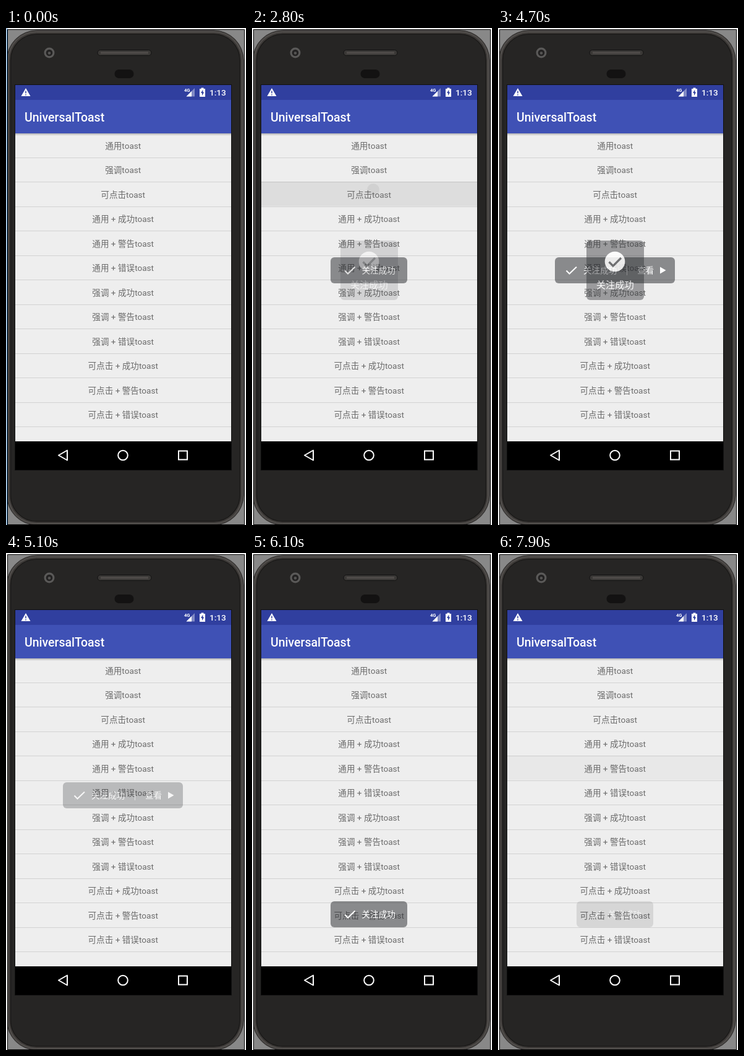
Write an HTML page that moves like this. It is 388 px wide and 802 px high and loops after 8000 ms.

```html
<!DOCTYPE html>
<html lang="zh-CN">
<head>
<meta charset="utf-8">
<title>UniversalToast</title>
<style>
html, body { margin: 0; width: 100%; height: 100%; overflow: hidden; background: #fff; }
svg { display: block; width: 388px; height: 802px; font-family: Roboto, "Noto Sans CJK SC", "Noto Sans CJK", sans-serif; }
.mid { text-anchor: middle; }
.toast { fill: #fff; font-size: 13.6px; }
.box { fill: #2a2c30; fill-opacity: .51; }
.line { fill: none; stroke: #fff; stroke-width: 2; }
</style>
</head>
<body>
<svg viewBox="0 0 388 802">
  <defs>
    <linearGradient id="shade" x2="0" y2="1">
      <stop offset="0" stop-color="#000" stop-opacity=".25"/><stop offset="1" stop-color="#000" stop-opacity="0"/>
    </linearGradient>
    <clipPath id="list"><rect x="15" y="170" width="349" height="497"/></clipPath>
    <path id="check" class="line" d="M-8 .5 L-3 5.5 L8.5 -5.5"/>
  </defs>

  <rect x="2" y="2" width="384" height="800" fill="#888"/>
  <rect x="1.5" y="4" width="382.5" height="798" rx="48" fill="#4a4745" stroke="#2b2928"/>
  <rect x="4" y="6.5" width="377.5" height="793" rx="45.5" fill="#3d3a38" stroke="#5a5754"/>
  <rect x="7.5" y="10" width="370.5" height="786" rx="42" fill="#262524" stroke="#1b1a19" stroke-width="1.5"/>
  <path d="M2.5 802V2.5H385.5V802M2 801.5H386" fill="none" stroke="#000"/>
  <rect id="edge" x="1" width="1" height="802"/>

  <circle cx="70" cy="40" r="8.5" fill="#5a5958"/>
  <circle cx="70" cy="40" r="5.3" fill="#232222"/>
  <circle cx="70" cy="40.5" r="2.3" fill="#555453"/>
  <rect x="148" y="35.5" width="87" height="9" rx="4.5" fill="#3a3836" stroke="#111"/>
  <path d="M153 40H230" stroke="#504d4a" stroke-width="3"/>
  <rect x="175.5" y="67" width="31" height="14" rx="7" fill="#131212"/>

  <rect x="14" y="91" width="351" height="623" fill="#111"/>
  <rect x="15" y="92" width="349" height="575" fill="#eee"/>
  <g id="rows" clip-path="url(#list)"></g>
  <rect x="15" y="170" width="349" height="4" fill="url(#shade)"/>
  <rect x="15" y="92" width="349" height="24" fill="#303f9f"/>
  <rect x="15" y="116" width="349" height="54" fill="#3f51b5"/>
  <text x="30" y="150.5" font-size="19.5" font-weight="500" fill="#fff">UniversalToast</text>

  <g fill="#fff">
    <path d="M32 97L39.5 110H24.5Z"/>
    <path d="M32 101.5V105.5M32 107V108.6" stroke="#303f9f" stroke-width="1.5"/>
    <path d="M305 97V110.5H291.5Z" fill-opacity=".4"/>
    <path d="M300 102V110.5H291.5Z"/>
    <text x="288" y="103" font-size="7.6" font-weight="700">4G</text>
    <path d="M313 98H315.5V96.5H319.5V98H322V111H313Z"/>
    <path d="M318.3 99.5L315 105H317V109.2L320.2 103.6H318.3Z" fill="#303f9f"/>
    <text x="329" y="109" font-size="13.6" font-weight="500">1:13</text>
  </g>

  <g id="wide">
    <rect class="box" x="92" y="370" width="194" height="42" rx="6"/>
    <use href="#check" x="118.5" y="391"/>
    <text class="toast" x="138" y="396">关注成功</text>
    <path d="M208.5 384V399" stroke="#fff" stroke-opacity=".65"/>
    <text class="toast" x="225" y="396">查看</text>
    <path d="M262 385.5L271.5 391L262 396.5Z" fill="#fff"/>
  </g>
  <g id="plain">
    <rect class="box" x="127" y="370" width="124" height="42" rx="6"/>
    <use href="#check" x="158" y="391"/>
    <text class="toast" x="177.5" y="396">关注成功</text>
  </g>
  <g id="strong">
    <rect class="box" x="143" y="343" width="93" height="96" rx="6"/>
    <circle cx="189" cy="377" r="16.3" fill="#fff"/>
    <path d="M179.5 377.5L186 384L199 371" fill="none" stroke="#6d6e70" stroke-width="3.2"/>
    <text class="mid" x="189.3" y="419.5" font-size="15.3" fill="#fff">关注成功</text>
  </g>

  <rect x="15" y="667" width="349" height="46"/>
  <path class="line" stroke-linejoin="round" d="M99 681.5V697.5L85 689.5Z"/>
  <circle class="line" cx="189" cy="689.5" r="7.8"/>
  <rect class="line" x="279" y="682.5" width="14" height="14"/>
</svg>
<script>
const LOOP = 8000, STEP = 100, TOP = 170.4, ROW = 39.47;
const $ = id => document.getElementById(id);
const kinds = ['通用', '强调', '可点击'];
const states = ['成功', '警告', '错误'];
const labels = [
  ...kinds.map(k => k + 'toast'),
  ...kinds.flatMap(k => states.map(s => `${k} + ${s}toast`))
];

$('rows').innerHTML = labels.map((label, i) => {
  const y = TOP + i * ROW;
  return `<rect id="press${i}" x="15" y="${Math.round(y - 1)}" width="349" height="${ROW}" opacity="0"/>
    <text class="mid" x="189.2" y="${y + 24.4}" font-size="13.6" fill="#6c6c6c">${label}</text>
    <rect x="15" y="${Math.round(y + ROW - 1)}" width="349" height="1" fill="#d2d2d2"/>`;
}).join('') + '<circle id="ripple" cx="196" cy="261" r="10" opacity="0"/>';

// Piecewise linear value through [time, value] points.
function ramp(t, ...pts) {
  if (t <= pts[0][0]) return pts[0][1];
  for (let i = 1; i < pts.length; i++) {
    const [a, u] = pts[i - 1], [b, v] = pts[i];
    if (t <= b) return u + (v - u) * (t - a) / (b - a);
  }
  return pts[pts.length - 1][1];
}
const show = (id, v) => $(id).setAttribute('opacity', v);
const tap = (t, start) => ramp(t, [start - 100, 0], [start, 1], [start + 100, 1], [start + 400, 0]);

function draw(t) {
  const low = t >= 5400;
  $('edge').setAttribute('fill', t < 600 ? '#3078b8' : '#fff');
  $('plain').setAttribute('transform', `translate(0 ${low ? 192 : 0})`);
  show('plain', low
    ? ramp(t, [5700, 0], [6100, 1], [7600, 1], [7900, .24])
    : ramp(t, [900, 0], [1300, 1], [2800, 1], [3200, 0]));
  show('strong', ramp(t, [2700, 0], [2800, .28], [3100, 1], [4600, 1], [4700, .83], [5000, 0]));
  show('wide', ramp(t, [3000, 0], [3400, 1], [4900, 1], [5100, .52], [5300, 0]));

  show('press0', .07 * tap(t, 900));
  show('press1', t >= 1600 && t < 1800 ? .02 : 0);
  show('press2', .07 * tap(t, 2800));
  show('press3', .07 * tap(t, 5700));
  show('press4', .025 * ramp(t, [7700, 0], [7900, 1]));
  show('ripple', .05 * ramp(t, [2700, 0], [2800, 1], [3000, 0]));
}

function tick(now) {
  draw(Math.floor(now % LOOP / STEP) * STEP);
  requestAnimationFrame(tick);
}
draw(0);
requestAnimationFrame(tick);
</script>
</body>
</html>
```
